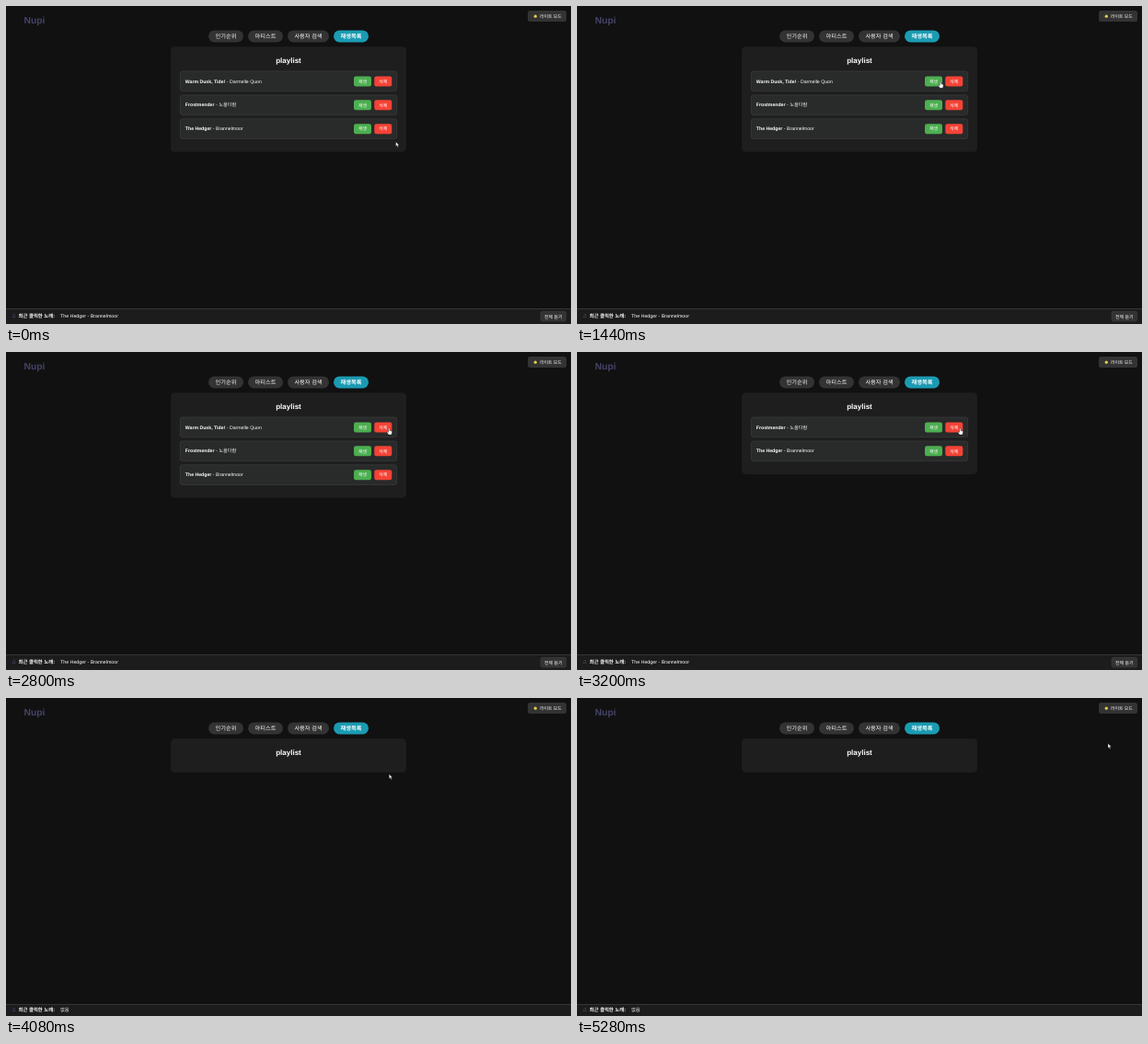
Recreate the animation shown at these times as an HTML page. Size 614 by 346 pixels, loop 5360 ms.

```html
<!DOCTYPE html>
<html lang="ko">
<head>
<meta charset="utf-8">
<style>
html, body { margin: 0; width: 100%; height: 100%; overflow: hidden; background: #111; }
svg { display: block; width: 100vw; height: 100vh; }
text {
  font: 5.2px "Liberation Sans", "Noto Sans CJK KR", "Noto Sans CJK", sans-serif;
  text-rendering: geometricPrecision; white-space: pre;
}
.b { font-weight: bold; }
.m { text-anchor: middle; }
</style>
</head>
<body>
<svg viewBox="0 0 614 346">
  <g id="page"></g>
  <g id="cursor" stroke="#111" stroke-width=".4" stroke-linejoin="round" fill="#fff">
    <path id="arrow" d="M0 0V5L1.2 3.9L2.1 5.9L2.9 5.5L2.1 3.6H3.6Z"/>
    <path id="hand" d="M-.7 .5Q0-.4 .7 .5V2.7L2.7 3.2Q3.4 3.4 3.3 4.3L2.7 7.2H-.6L-2.2 4.7Q-2.4 3.7-1.4 4L-.7 4.6Z"/>
  </g>
</svg>
<script>
const LOOP = 5360, STEP = 80;
const ROW_Y = 71, ROW_GAP = 25.9, BUTTON_DY = 5.4;
const BUTTON_X = [378, 400.3], BUTTON_W = 19, BUTTON_H = 11;
const SONGS = [
  ["Warm Dusk, Tide!", "Darmelle Quon"],
  ["Frostmender", "노을다람"],
  ["The Hedger", "Brannelmoor"]
];
const REMOVALS = [3200, 3680, 4000];
// time, x, y
const PATH = [
  [80, 423.6, 147.8], [320, 422, 118], [400, 422, 118], [640, 413.2, 80.6],
  [880, 402, 81], [960, 402, 81], [1200, 389, 81.5], [1360, 389, 81.5],
  [1440, 394.9, 82.1], [1760, 416.3, 82.8], [4240, 416.3, 82.8], [4320, 425.8, 92.8],
  [4400, 431, 96], [4480, 431, 96], [5040, 562, 59], [5280, 577, 49.5]
];

const $ = id => document.getElementById(id);

const box = (x, y, w, h, r, fill, line = "none") =>
  `<rect x="${x}" y="${y}" width="${w}" height="${h}" rx="${r}" fill="${fill}" stroke="${line}" stroke-width=".5"/>`;

const text = (x, y, s, size = 5.2, cls = "", fill = "#fff") =>
  `<text x="${x}" y="${y}" class="${cls}" style="font-size:${size}px" fill="${fill}">${s}</text>`;

const button = (x, y, label, fill) =>
  box(x, y, BUTTON_W, BUTTON_H, 2.2, fill) + text(x + BUTTON_W / 2, y + 7.2, label, 5, "m");

const tab = (x, w, label, on) =>
  box(x, 26.4, w, 13, 6.5, on ? "#1b9bb2" : "#333") +
  text(x + w / 2, 34.9, label, 6.2, on ? "m b" : "m");

function row([title, artist], i) {
  const y = ROW_Y + ROW_GAP * i;
  return box(189.3, y, 235.4, 21.7, 2.5, "#292a2a", "#444") +
    text(194.8, y + 12.5, `<tspan class="b">${title}</tspan> - ${artist}`) +
    button(BUTTON_X[0], y + BUTTON_DY, "재생", "#4caf50") +
    button(BUTTON_X[1], y + BUTTON_DY, "삭제", "#f44336");
}

function footer(full) {
  const top = full ? 329 : 333, y = full ? 339.2 : 341;
  const [title, artist] = SONGS[2];
  return box(0, top, 614, 20, 0, "#1c1c1c") + box(0, top, 614, 1, 0, "#363636") +
    text(6, y, "♫", 6.5, "", "#665c8c") +
    text(13.5, y, "최근 클릭한 노래:", 5.4, "b") +
    text(59, y, full ? `${title} - ${artist}` : "없음", 5.3) +
    (full ? box(581, 332.3, 27.7, 10.8, 2, "#333", "#444") + text(594.8, 339.6, "전체 듣기", 5, "m") : "");
}

function page(songs) {
  const n = songs.length;
  return text(19.5, 19.1, "Nupi", 10.3, "b", "#44436a") +
    box(567, 5, 42, 12, 2.5, "#333") +
    `<circle cx="575.3" cy="11.2" r="1.6" fill="#e3d04c"/>` +
    text(580, 12.7, "라이트 모드", 4.9) +
    tab(220, 38, "인기순위") + tab(263, 38, "아티스트") +
    tab(306, 45, "사용자 검색") + tab(356, 38, "재생목록", true) +
    box(179, 44.3, 256, 36.8 + ROW_GAP * n, 4.5, "#1e1e1e") +
    text(307, 61.6, "playlist", 8, "m b") +
    songs.map(row).join("") + footer(n > 0);
}

function place(t) {
  const i = PATH.findIndex(p => p[0] >= t);
  if (i === 0) return PATH[0].slice(1);
  const [t0, x0, y0] = PATH[i - 1], [t1, x1, y1] = PATH[i];
  const k = (t - t0) / (t1 - t0);
  return [x0 + (x1 - x0) * k, y0 + (y1 - y0) * k];
}

function overButton(x, y, rows) {
  const dy = y - ROW_Y - BUTTON_DY, inRow = dy % ROW_GAP;
  return dy < ROW_GAP * rows && inRow >= 0 && inRow < BUTTON_H &&
    BUTTON_X.some(b => x >= b && x <= b + BUTTON_W);
}

let shown = -1;
function draw(now) {
  const t = Math.floor(now % LOOP / STEP) * STEP;
  const gone = REMOVALS.filter(r => t >= r).length;
  if (gone !== shown) {
    shown = gone;
    $("page").innerHTML = page(SONGS.slice(gone));
  }
  const [x, y] = place(t);
  const over = overButton(x, y, SONGS.length - gone);
  $("cursor").setAttribute("transform", `translate(${x} ${y})`);
  $("hand").style.display = over ? "" : "none";
  $("arrow").style.display = over ? "none" : "";
}

const start = performance.now();
function tick() {
  draw(performance.now() - start);
  requestAnimationFrame(tick);
}
tick();
</script>
</body>
</html>
```
